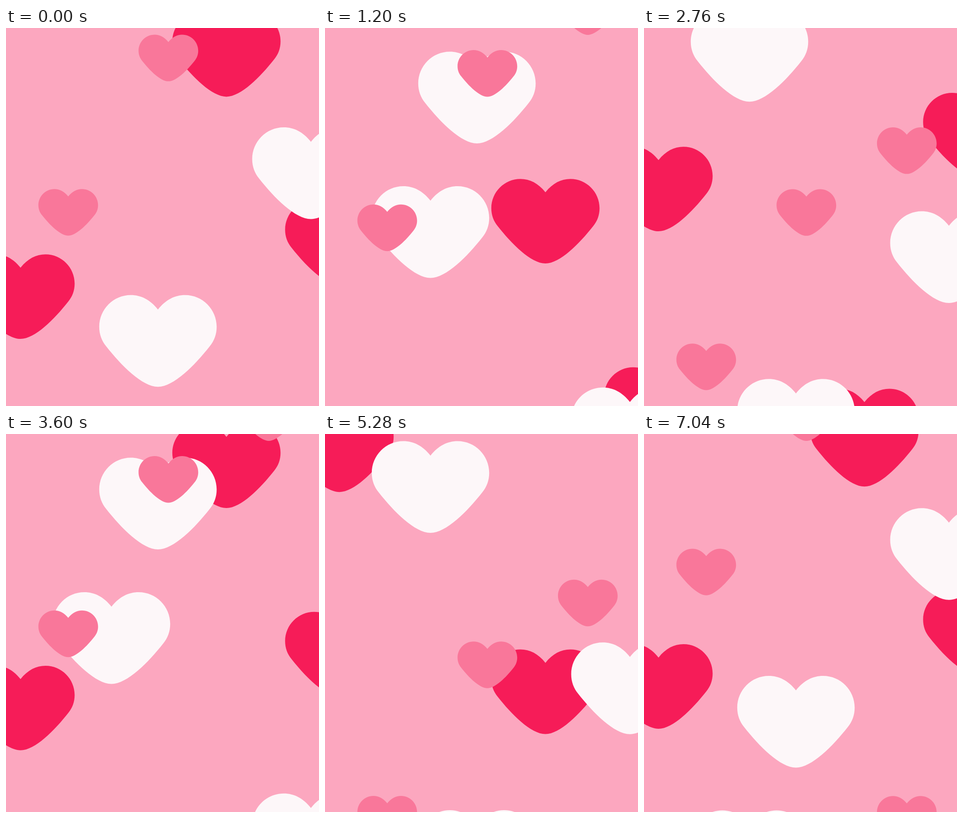
An HTML page with a canvas for the animation above (7.08 s loop, 681x822 px).

```html
<!DOCTYPE html>
<html lang="en">
<head>
<meta charset="utf-8">
<title>Falling hearts</title>
<style>
  html, body { margin: 0; width: 100%; height: 100%; overflow: hidden; background: #fca7bf; }
  canvas { display: block; }
</style>
</head>
<body>
<canvas id="stage" width="681" height="822"></canvas>
<script>
const ctx = document.getElementById('stage').getContext('2d');
const LOOP = 7080;
const TICK = 40;

// Right half from notch to tip: x is measured from the axis, y from the top.
const outline = [
  [0, 31.5], [17, 10], [37, 0], [59, 0],
  [97, 0], [127.75, 31], [127.75, 69],
  [127.75, 86], [122, 100], [113, 111],
  [80, 153], [34, 199.5], [0, 199.5]
];

function makeHeart() {
  const mirrored = outline.map(([x, y]) => [-x, y]).reverse();
  const points = outline.concat(mirrored.slice(1));
  const path = new Path2D();
  path.moveTo(...points[0]);
  for (let i = 1; i < points.length; i += 3) {
    path.bezierCurveTo(...points[i], ...points[i + 1], ...points[i + 2]);
  }
  path.closePath();
  return path;
}

const heart = makeHeart();

// Back to front; each heart is [axis x, top y at the start].
const layers = [
  { color: '#f61c58', scale: 0.9217, speed: 11.7, ticks: 90,
    hearts: [[479.6, -34.5], [31.6, 492.2], [725, 375]] },
  { color: '#fdf7f9', scale: 1, speed: 18.25, ticks: 60,
    hearts: [[330.6, 580.8], [229.5, -221.8], [663.4, 216]] },
  { color: '#f9779a', scale: 0.508, speed: 33.6, ticks: 30,
    hearts: [[353.3, 14.5], [135.4, 350.2], [571.8, -120]] }
];

const mod = (a, n) => ((a % n) + n) % n;

function draw(ms) {
  const tick = Math.floor(mod(ms, LOOP) / TICK);
  const step = tick < 2 ? 0 : tick + 1; // opening pose is held for two ticks
  ctx.setTransform(1, 0, 0, 1, 0, 0);
  ctx.fillStyle = '#fca7bf';
  ctx.fillRect(0, 0, 681, 822);
  for (const { color, scale, speed, ticks, hearts } of layers) {
    const lead = 225 * scale;
    ctx.fillStyle = color;
    for (const [x, top] of hearts) {
      const y = mod(top + speed * step + lead, speed * ticks) - lead;
      ctx.setTransform(scale, 0, 0, scale, x, y);
      ctx.fill(heart);
    }
  }
}

let start;
function frame(now) {
  if (start === undefined) start = now;
  draw(now - start);
  requestAnimationFrame(frame);
}
draw(0);
requestAnimationFrame(frame);
</script>
</body>
</html>
```
